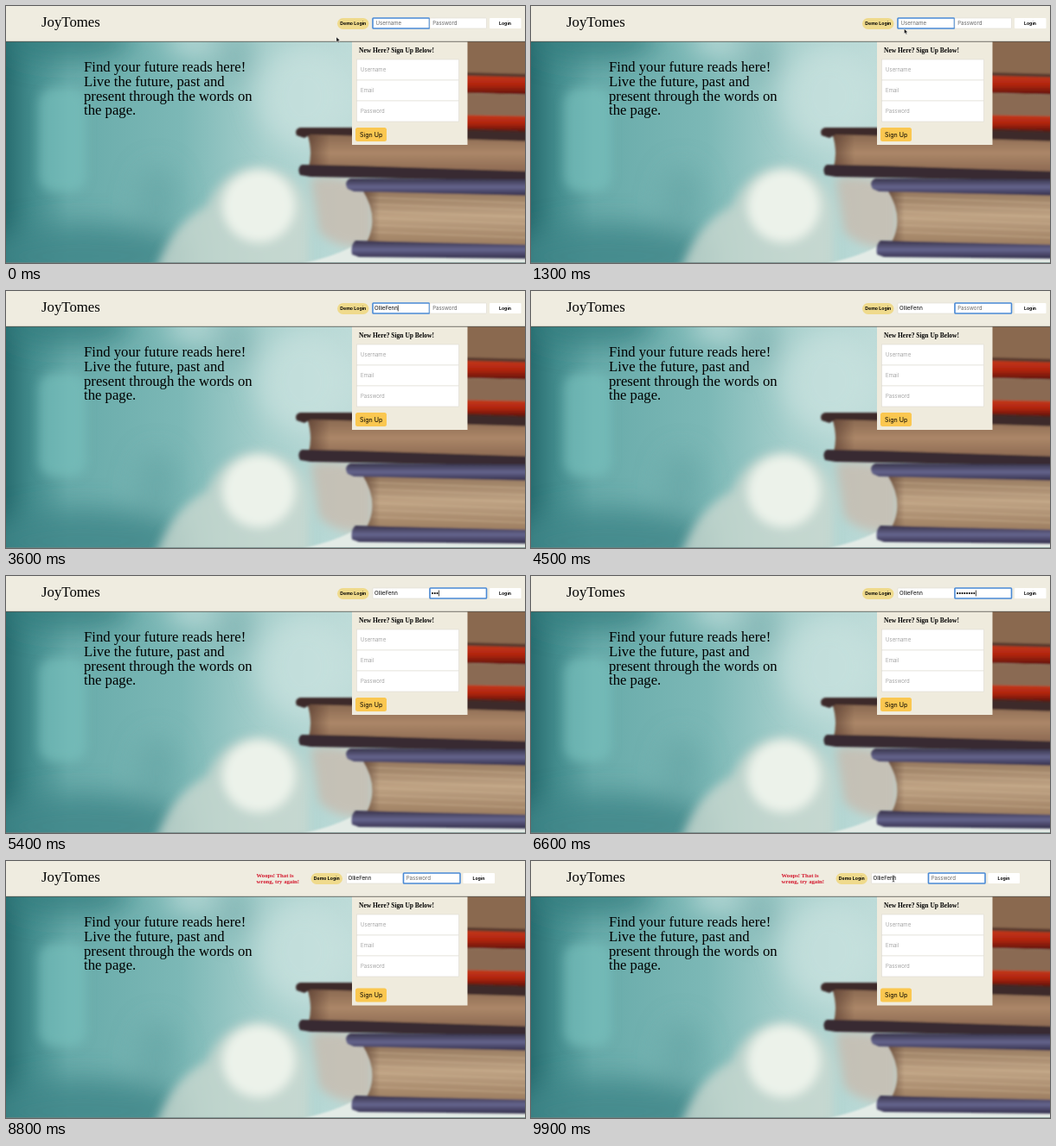
An HTML page that plays this animation: 600 by 298 pixels, repeating every 10 s.

```html
<!DOCTYPE html>
<html lang="en">
<head>
<meta charset="utf-8">
<title>JoyTomes</title>
<style>
  html, body { margin: 0; width: 100%; height: 100%; overflow: hidden; background: #efece0; }
  svg { display: block; width: 600px; height: 298px; }
  text { font-family: Inter, "Liberation Sans", sans-serif; font-size: 6.1px; white-space: pre; }
  .serif { font-family: "Liberation Serif", serif; }
  .bold { font-weight: 700; }
  .hint { fill: #666; }
  .light .hint { fill: #8b8b8b; font-weight: 300; }
  .field { fill: #fff; stroke: #dedbd2; stroke-width: .6; }
  .field.on { stroke: #4a8ad6; stroke-width: 1.6; }
  .dots { font-family: "Liberation Sans", sans-serif; font-size: 7.5px; letter-spacing: .15px; }
</style>
</head>
<body>
<svg viewBox="0 0 600 298">
  <defs>
    <linearGradient id="air">
      <stop offset="0" stop-color="#286d70"/>
      <stop offset=".05" stop-color="#438c8d"/>
      <stop offset=".12" stop-color="#68abaa"/>
      <stop offset=".34" stop-color="#7cb8b6"/>
      <stop offset=".5" stop-color="#a6cfcc"/>
      <stop offset=".66" stop-color="#bddbd8"/>
      <stop offset="1" stop-color="#a9cbc8"/>
    </linearGradient>
    <linearGradient id="pages" x2="0" y2="1">
      <stop offset="0" stop-color="#87664f"/>
      <stop offset=".5" stop-color="#ab8768"/>
      <stop offset="1" stop-color="#8a6750"/>
    </linearGradient>
    <linearGradient id="lowPages" x2="0" y2="1">
      <stop offset="0" stop-color="#93765c"/>
      <stop offset=".45" stop-color="#bfa384"/>
      <stop offset="1" stop-color="#98795c"/>
    </linearGradient>
    <linearGradient id="cover" x2="0" y2="1">
      <stop offset="0" stop-color="#383249"/>
      <stop offset=".5" stop-color="#65658d"/>
      <stop offset="1" stop-color="#322d49"/>
    </linearGradient>
    <linearGradient id="red" x2="0" y2="1">
      <stop offset="0" stop-color="#c5391a"/>
      <stop offset=".5" stop-color="#b02410"/>
      <stop offset="1" stop-color="#5c130c"/>
    </linearGradient>
    <linearGradient id="edge">
      <stop offset="0" stop-color="#4a2f26" stop-opacity=".6"/>
      <stop offset=".1" stop-color="#4a2f26" stop-opacity="0"/>
    </linearGradient>
    <filter id="haze" x="-80%" y="-80%" width="260%" height="260%"><feGaussianBlur stdDeviation="15"/></filter>
    <filter id="mist" x="-40%" y="-40%" width="180%" height="180%"><feGaussianBlur stdDeviation="6"/></filter>
    <filter id="soft" x="-5%" y="-5%" width="110%" height="110%"><feGaussianBlur stdDeviation=".9"/></filter>
  </defs>

  <!-- Blurred backdrop -->
  <rect y="41" width="600" height="257" fill="url(#air)"/>
  <g filter="url(#haze)">
    <ellipse cx="70" cy="40" rx="75" ry="24" fill="#337b7d" opacity=".75"/>
    <ellipse cx="215" cy="42" rx="30" ry="18" fill="#c3dfdd" opacity=".8"/>
    <ellipse cx="265" cy="60" rx="22" ry="28" fill="#79acac" opacity=".5"/>
    <ellipse cx="345" cy="105" rx="55" ry="60" fill="#cbe3e0" opacity=".7"/>
    <ellipse cx="90" cy="290" rx="120" ry="38" fill="#3f8789" opacity=".85"/>
    <ellipse cx="175" cy="225" rx="25" ry="40" fill="#65a3a3" opacity=".6"/>
  </g>
  <g filter="url(#mist)">
    <rect x="38" y="95" width="55" height="120" rx="18" fill="#79c0bd" opacity=".65"/>
    <path d="M172 312Q188 255 232 232Q250 188 292 186Q345 190 350 240V312z" fill="#cbd9d0" opacity=".8"/>
    <circle cx="292" cy="232" r="42" fill="#f1f5ee" opacity=".9"/>
    <path d="M352 200Q395 192 425 215V278Q385 285 362 262z" fill="#c9b9ab" opacity=".75"/>
  </g>
  <path d="M335 300Q385 290 408 274L610 284V300z" fill="#e3ebe6" filter="url(#soft)"/>

  <!-- Book stack -->
  <g filter="url(#soft)">
    <path d="M500 38H610V82H500z" fill="#8a6950"/>
    <path d="M500 76L610 79V84L500 81z" fill="#5a3a2d"/>
    <path d="M500 80L610 83V103L500 100z" fill="url(#red)"/>
    <path d="M500 100L610 103V129H500z" fill="#8a6a53"/>
    <path d="M500 126L610 128V146H500z" fill="url(#red)"/>
    <path d="M500 141L610 145V158H500z" fill="#4a2620"/>
    <path d="M348 147L610 153V194L350 187Q355 168 348 147z" fill="url(#pages)"/>
    <path d="M348 147L610 153V194L350 187Q355 168 348 147z" fill="url(#edge)"/>
    <path d="M340 141Q333 143 336 150L345 153L352 149L610 157V147L400 141z" fill="#3d2a2a"/>
    <path d="M342 184Q336 188 340 196L352 198L610 203V192L400 185z" fill="#382a30"/>
    <path d="M412 213L610 219V282L417 274Q432 245 412 213z" fill="url(#lowPages)"/>
    <path d="M420 222L610 229M424 230L610 237M426 238L610 245M426 246L610 253M425 254L610 261M423 262L610 269" stroke="#d9c0a0" opacity=".5"/>
    <path d="M412 213L610 219V282L417 274Q432 245 412 213z" fill="url(#edge)"/>
    <path d="M398 200Q390 204 395 212L402 215L610 220V201z" fill="url(#cover)"/>
    <path d="M404 272Q398 277 400 288L408 291L610 293V277z" fill="url(#cover)"/>
  </g>
  <path d="M0 297.5H600" stroke="#6e8583" stroke-width=".7"/>

  <g id="tagline"></g>

  <!-- Sign-up panel -->
  <rect id="panel" x="400" y="41" width="133.5" height="120" fill="#efebdd"/>
  <text class="serif bold" x="408" y="54.3" style="font-size:7.5px">New Here? Sign Up Below!</text>
  <g class="light" id="form"></g>
  <g id="signUp">
    <rect x="404" y="141" width="36" height="16" rx="2.5" fill="#fac750"/>
    <text x="409" y="151.6" style="font-size:7.1px">Sign Up</text>
  </g>

  <!-- Header -->
  <rect width="600" height="41" fill="#efece0"/>
  <path d="M0 41.3H600" stroke="#55544c" stroke-width=".8"/>
  <text class="serif" x="41" y="24" style="font-size:16.8px">JoyTomes</text>
  <g id="error" fill="#d3142a">
    <text class="serif bold" x="289.5" y="19.2" style="font-size:6.7px">Woops! That is</text>
    <text class="serif bold" x="289.5" y="25.8" style="font-size:6.7px">wrong, try again!</text>
  </g>
  <g id="bar">
    <rect x="383" y="14" width="36.5" height="13" rx="6.5" fill="#efda8c"/>
    <text class="bold" x="386.3" y="22.3" style="font-size:5.2px">Demo Login</text>
    <rect class="field" id="userBox" x="424" y="14" width="65.5" height="12" rx=".8"/>
    <rect class="field" id="passBox" x="490" y="14" width="65.5" height="12" rx=".8"/>
    <text id="user" y="22.3"></text>
    <text id="pass" y="22.3"></text>
    <path id="caret" d="M0 16.5V23.5" stroke="#000" stroke-width=".7"/>
    <rect x="559" y="14" width="36.5" height="12" rx="1" fill="#fff"/>
    <text class="bold" x="570" y="22" style="font-size:5.2px">Login</text>
  </g>
  <path id="arrow" d="M0 0V5.6L1.3 4.4L2.2 6.5L3.1 6.1L2.2 4.1H4z" stroke="#fff" stroke-width=".4"/>
  <path id="beam" d="M-1.3 -3.5Q0 -3.5 0 -2.7Q0 -3.5 1.3 -3.5M0 -2.7V2.7M-1.3 3.5Q0 3.5 0 2.7Q0 3.5 1.3 3.5" fill="none" stroke="#111" stroke-width=".7"/>
</svg>
<script>
const $ = id => document.getElementById(id);
const show = (id, on) => $(id).style.display = on ? '' : 'none';
const move = (id, x, y) => $(id).setAttribute('transform', `translate(${x} ${y})`);
const clamp = v => Math.min(1, Math.max(0, v));
const ease = v => v * v * (3 - 2 * v);

const NAME = 'OllieFenn', SECRET = '•'.repeat(8);
const LOOP = 10000, STEP = 100, KEY = 200;
const AT = { user: 1900, pass: 5000, focusPass: 4400, error: 7000, clear: 8500, mouse: 9200 };

$('tagline').innerHTML = ['Find your future reads here!', 'Live the future, past and',
  'present through the words on', 'the page.'].map((line, i) =>
  `<text class="serif" x="90" y="${76.3 + i * 16.7}" style="font-size:16.7px">${line}</text>`).join('');

$('form').innerHTML = ['Username', 'Email', 'Password'].map((label, i) =>
  `<rect class="field" x="405.5" y="${62 + i * 24}" width="118" height="24"/>
   <text class="hint" x="410" y="${76.3 + i * 24}">${label}</text>`).join('');

function typed(text, start, t) {
  return text.slice(0, Math.max(0, Math.floor((t - start) / KEY) + 1));
}

function fill(id, value, hint, x, style) {
  const el = $(id);
  el.textContent = value || hint;
  el.setAttribute('class', value ? style : 'hint');
  el.setAttribute('x', value ? x : x + 1.5);
}

function draw(t) {
  const user = typed(NAME, AT.user, t);
  const pass = t < AT.clear ? typed(SECRET, AT.pass, t) : '';
  const onPass = t >= AT.focusPass, failed = t >= AT.error;

  fill('user', user, 'Username', 426, '');
  fill('pass', pass, 'Password', 491.7, 'dots');
  $('userBox').classList.toggle('on', !onPass);
  $('passBox').classList.toggle('on', onPass);

  const active = onPass ? 'pass' : 'user';
  show('caret', !failed && (onPass ? pass : user));
  move('caret', +$(active).getAttribute('x') + $(active).getComputedTextLength() + .5, 0);

  show('error', failed);
  move('bar', failed ? -30.5 : 0, 0);
  $('panel').setAttribute('height', failed ? 126.5 : 120);
  move('signUp', 0, failed ? 6.5 : 0);

  const go = ease(clamp(t / 1200));
  show('arrow', t < AT.user);
  move('arrow', 382 + 49.5 * go, 36 - 9.5 * go);
  const back = ease(clamp((t - AT.mouse) / 600));
  show('beam', t >= AT.mouse);
  move('beam', 431 - 12 * back, 26 - 5.5 * back);
}

const begin = performance.now();
function tick() {
  const t = (performance.now() - begin) % LOOP;
  draw(Math.floor(t / STEP) * STEP);
  requestAnimationFrame(tick);
}
tick();
</script>
</body>
</html>
```
